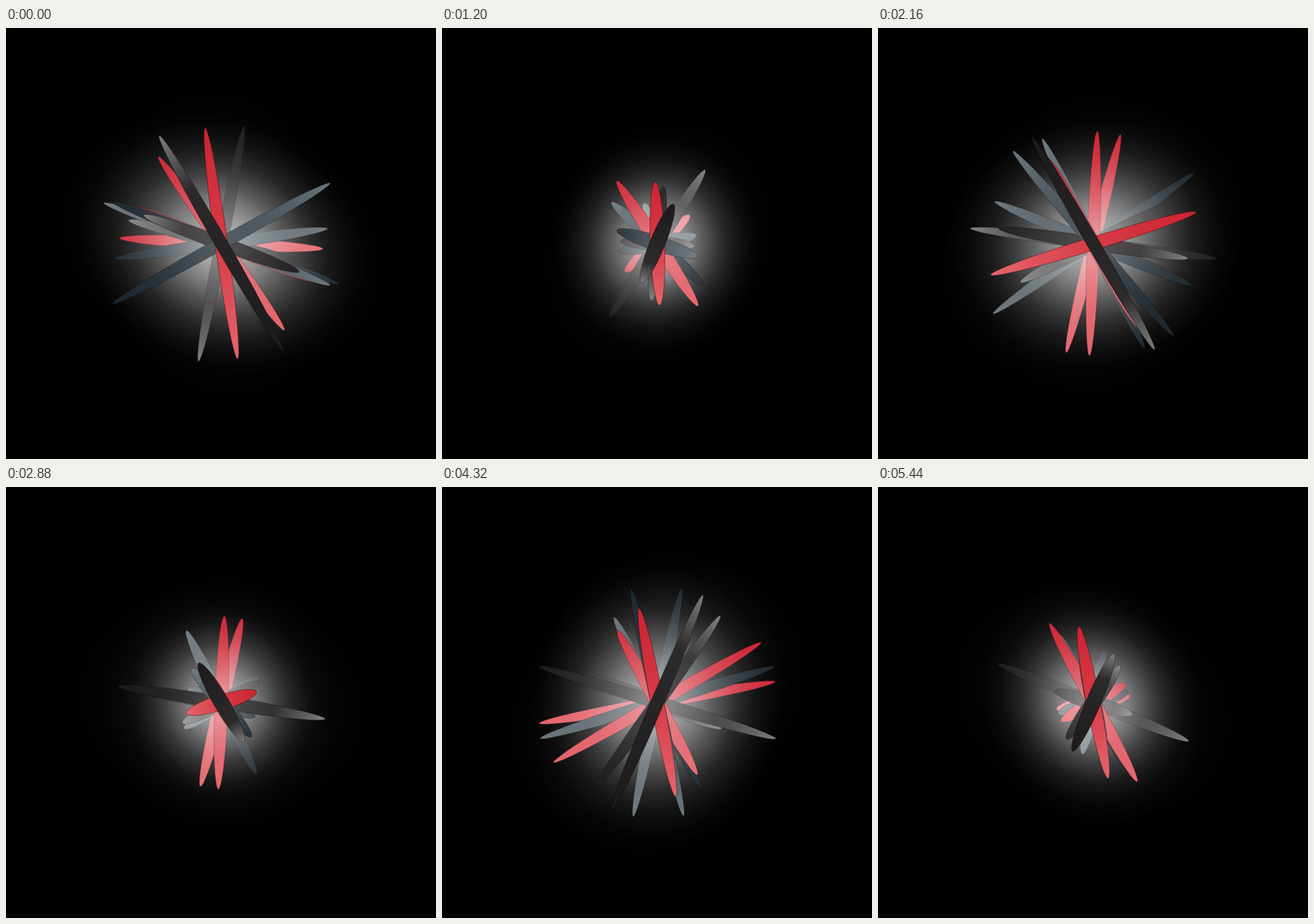
An HTML page that plays this animation: 597 px wide and 598 px high, repeating every 5520 ms.

```html
<!DOCTYPE html>
<html lang="en">
<head>
<meta charset="utf-8">
<title>Spokes</title>
<style>
  html, body { margin: 0; width: 100%; height: 100%; overflow: hidden; background: #000; }
  svg { display: block; width: 100%; height: 100%; }
</style>
</head>
<body>
<svg viewBox="0 0 597 598">
  <defs>
    <linearGradient id="black">
      <stop offset="0" stop-color="#1d1a1b"/>
      <stop offset=".75" stop-color="#2d2a2b"/>
      <stop offset="1" stop-color="#808080"/>
    </linearGradient>
    <linearGradient id="red">
      <stop offset="0" stop-color="#cb2331"/>
      <stop offset=".5" stop-color="#d63c47"/>
      <stop offset="1" stop-color="#e5656d"/>
    </linearGradient>
    <linearGradient id="slate">
      <stop offset="0" stop-color="#19232a"/>
      <stop offset=".6" stop-color="#303b42"/>
      <stop offset="1" stop-color="#6b767d"/>
    </linearGradient>
    <radialGradient id="glow">
      <stop offset="0" stop-color="#fff" stop-opacity=".19"/>
      <stop offset=".14" stop-color="#fff" stop-opacity=".17"/>
      <stop offset=".27" stop-color="#fff" stop-opacity=".125"/>
      <stop offset=".45" stop-color="#fff" stop-opacity=".068"/>
      <stop offset=".63" stop-color="#fff" stop-opacity=".029"/>
      <stop offset=".81" stop-color="#fff" stop-opacity=".0105"/>
      <stop offset="1" stop-color="#fff" stop-opacity="0"/>
    </radialGradient>
  </defs>
  <g id="burst" transform="translate(299 299)"></g>
</svg>
<script>
const LOOP = 5520, STEP = 80, PULSE = 2060;
const KINDS = ["black", "red", "slate"];

// Front to back: pulse delay in ms, then the headings turned through.
const SPOKES = [
  [0, 240, 112, 60, -67],
  [-200, 82, 88, 163, 79],
  [0, -29, 18, 229, 77],
  [500, 200, 96, 9, -54],
  [-300, 54, 57, 62, 61],
  [-200, 21, 222, 203, 243],
  [150, 101, 4, 187, 17],
  [350, 22, 57, 92, 150],
  [300, -8, -12, 244, 163],
  [-400, 194, -57, 152, 22],
  [350, 3, -41, 104, 170],
  [0, 199, 252, 145, 102]
];

const burst = document.getElementById("burst");

function addEllipse(attrs) {
  const el = document.createElementNS("http://www.w3.org/2000/svg", "ellipse");
  for (const key in attrs) el.setAttribute(key, attrs[key]);
  return burst.appendChild(el);
}

function place(el, rx, ry, angle) {
  el.setAttribute("rx", rx);
  el.setAttribute("ry", ry);
  el.setAttribute("transform", `rotate(${angle})`);
}

// Paint back to front; every second spoke lights up what lies behind it.
const spokes = SPOKES.map(([delay, ...headings], i) => ({ delay, headings, i }));
for (const spoke of [...spokes].reverse()) {
  if (spoke.i % 2) spoke.glow = addEllipse({ fill: "url(#glow)" });
  spoke.blade = addEllipse({
    fill: `url(#${KINDS[spoke.i % 3]})`,
    stroke: "#000", "stroke-width": .6, "stroke-opacity": .6
  });
}

const shortestTurn = (a, b) => ((b - a + 540) % 360 + 360) % 360 - 180;

function ease(t, from, to) {
  const u = Math.min(1, Math.max(0, (t - from) / (to - from)));
  return u * u * (3 - 2 * u);
}

// Three turns with a long rest after the second.
function heading([a, b, c, d], t) {
  return a
    + shortestTurn(a, b) * ease(t, 0, 1200)
    + shortestTurn(b, c) * ease(t, 1280, 2160)
    + shortestTurn(c, d) * ease(t, 3440, 4320);
}

const reach = (delay, t) => 112 + 61 * Math.cos(2 * Math.PI * (t - delay) / PULSE);

function draw(now) {
  const t = Math.floor((now % LOOP) / STEP) * STEP;
  for (const { delay, headings, blade, glow } of spokes) {
    const size = reach(delay, t), angle = heading(headings, t);
    place(blade, size, 11.5 - size / 60, angle);
    if (glow) place(glow, size + 70, size * .4 + 110, angle);
  }
}

const start = performance.now();
function tick() {
  draw(performance.now() - start);
  requestAnimationFrame(tick);
}
draw(0);
requestAnimationFrame(tick);
</script>
</body>
</html>
```
